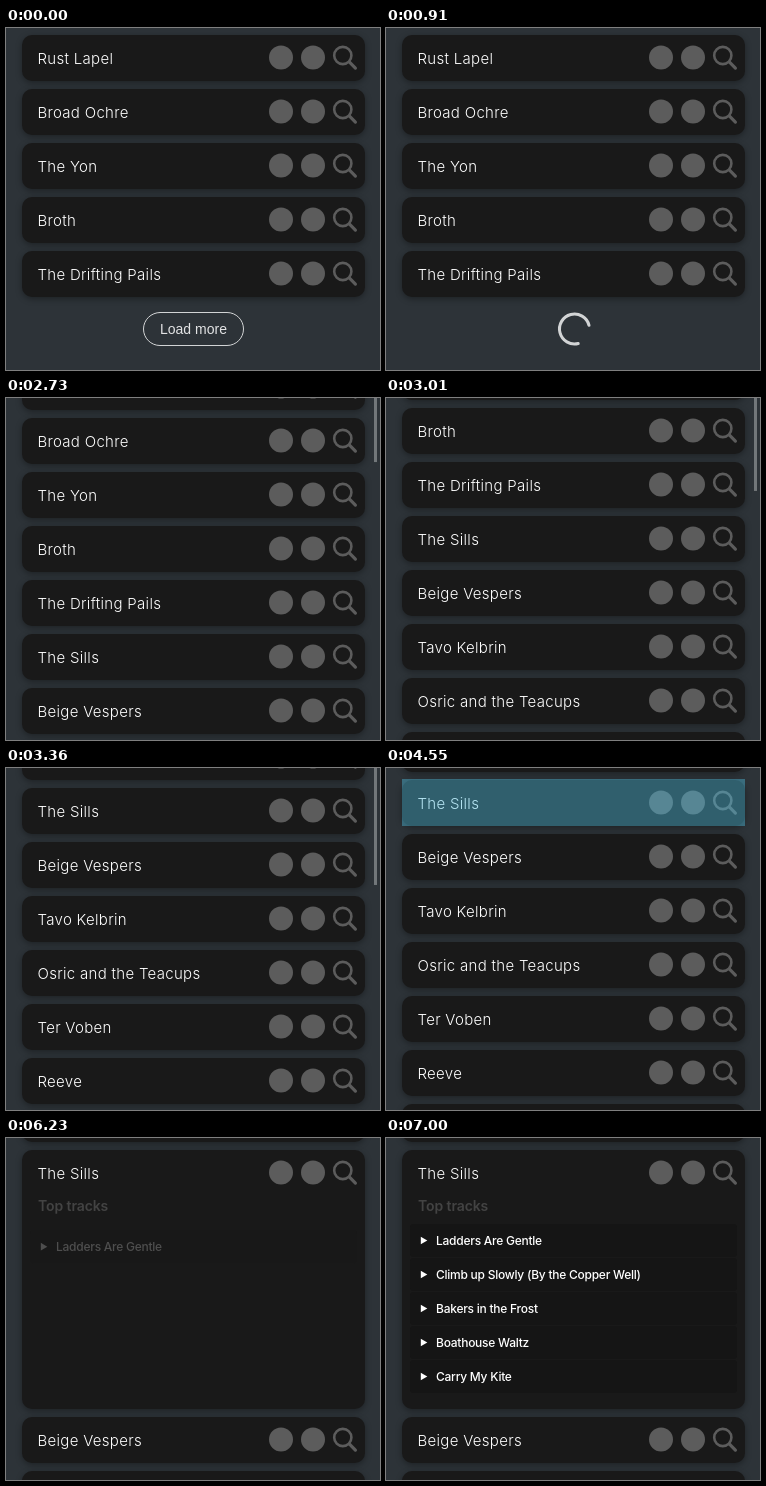
Animation, 374 px wide and 342 px high, one loop 7.84 s. Source, as an HTML page with a canvas:

```html
<!DOCTYPE html>
<html lang="en">
<head>
<meta charset="utf-8">
<title>Band list</title>
<style>
  html, body { margin: 0; width: 100%; height: 100%; overflow: hidden; background: #2d3338; }
  canvas { display: block; }
</style>
</head>
<body>
<canvas id="stage" width="374" height="342"></canvas>
<script>
const ctx = document.getElementById('stage').getContext('2d');
const LOOP = 7840, STEP = 70;
const PITCH = 54, CARD_H = 46, FIRST_Y = 7, OPEN = 5, GROW = 213, SCROLL = 265;
const SANS = 'Inter, "Open Sans", sans-serif';
const bands = ['Rust Lapel', 'Broad Ochre', 'The Yon', 'Broth', 'The Drifting Pails',
  'The Sills', 'Beige Vespers', 'Tavo Kelbrin', 'Osric and the Teacups', 'Ter Voben', 'Reeve', ''];
const tracks = ['Ladders Are Gentle', 'Climb up Slowly (By the Copper Well)',
  'Bakers in the Frost', 'Boathouse Waltz', 'Carry My Kite'];

const progress = (t, start, length) => Math.min(1, Math.max(0, (t - start) / length));
const easeOut = u => 1 - (1 - u) ** 2;

function text(str, x, y, font, color, spacing = 0) {
  ctx.font = font;
  ctx.letterSpacing = spacing + 'px';
  ctx.fillStyle = color;
  ctx.fillText(str, x, y);
}

function roundBox(x, y, w, h, r) {
  ctx.beginPath();
  ctx.roundRect(x, y, w, h, r);
}

function disc(x, y, r) {
  ctx.beginPath();
  ctx.arc(x, y, r, 0, 2 * Math.PI);
}

function tapFlash(x, y, w, h) {
  ctx.fillStyle = 'rgba(80,190,224,.42)';
  ctx.fillRect(x, y, w, h);
}

function icons(y) {
  ctx.fillStyle = ctx.strokeStyle = '#5c5c5c';
  for (const x of [275, 307]) {
    disc(x, y, 12);
    ctx.fill();
  }
  ctx.lineCap = 'round';
  ctx.lineWidth = 2.6;
  disc(336.8, y - 2, 8.6);
  ctx.stroke();
  ctx.lineWidth = 3.2;
  ctx.beginPath();
  ctx.moveTo(343.5, y + 4.7);
  ctx.lineTo(349.4, y + 10.6);
  ctx.stroke();
}

function card(name, y, h) {
  ctx.save();
  ctx.shadowColor = 'rgba(0,0,0,.35)';
  ctx.shadowBlur = 6;
  ctx.shadowOffsetY = 2;
  ctx.fillStyle = '#191919';
  roundBox(16, y, 343, h, 10);
  ctx.fill();
  ctx.restore();
  text(name, 31.5, y + 29, '300 15px ' + SANS, '#fff', .3);
  icons(y + 22.5);
}

function trackList(t, y, h) {
  ctx.save();
  roundBox(16, y, 343, h, 10);
  ctx.clip();
  text('Top tracks', 32, y + 61, '600 14px ' + SANS, '#434343', -.1);
  tracks.forEach((name, i) => {
    const p = easeOut(progress(t, 6190 + i * 120, 320));
    if (!p) return;
    const top = y + 74 + i * 34 + 8 * (1 - p), mid = top + 16.5;
    ctx.globalAlpha = p;
    ctx.fillStyle = '#151515';
    roundBox(24, top, 327, 33, 3);
    ctx.fill();
    ctx.fillStyle = '#fff';
    ctx.beginPath();
    ctx.moveTo(34.8, mid - 3.8);
    ctx.lineTo(41.3, mid);
    ctx.lineTo(34.8, mid + 3.8);
    ctx.fill();
    text(name, 50, mid + 4.5, '500 12px ' + SANS, '#fff', -.25);
  });
  ctx.restore();
}

function loadButton() {
  ctx.strokeStyle = '#d2d4d5';
  ctx.lineWidth = 1;
  roundBox(137.5, 284.5, 100, 33, 16.5);
  ctx.stroke();
  text('Load more', 154, 306, '14px "Liberation Sans", Arial, sans-serif', '#e2e3e4');
}

function spinner(t) {
  const a = (t - 700) / 1000 * 2 * Math.PI;
  ctx.strokeStyle = '#d2d4d5';
  ctx.lineWidth = 3;
  ctx.lineCap = 'round';
  ctx.beginPath();
  ctx.arc(188.5, 301, 15, a, a + 1.5 * Math.PI);
  ctx.stroke();
}

function draw(t) {
  ctx.globalAlpha = 1;
  ctx.fillStyle = '#2d3338';
  ctx.fillRect(0, 0, 374, 342);

  const u = progress(t, 2590, 910);
  const scroll = Math.round(SCROLL * (1 - (1 - u ** 1.4) ** 2.21));
  const grow = Math.round(GROW * easeOut(progress(t, 4550, 280)));
  const shown = easeOut(progress(t, 1850, 320));

  bands.forEach((name, i) => {
    const isNew = i >= OPEN;
    if (isNew && !shown) return;
    const y = FIRST_Y + i * PITCH - scroll + (i > OPEN ? grow : 0) + (isNew ? 8 * (1 - shown) : 0);
    const h = CARD_H + (i === OPEN ? grow : 0);
    if (y > 345 || y + h < -8) return;
    ctx.globalAlpha = isNew ? shown : 1;
    card(name, y, h);
    if (i === OPEN && grow) trackList(t, y, h);
    if (i === OPEN && t === 4550) tapFlash(16, y - 1, 343, CARD_H + 1);
  });
  ctx.globalAlpha = 1;

  if (t < 700) loadButton();
  else if (t < 1750) spinner(t);
  if (t === 630) tapFlash(136, 283, 103, 38);

  if (t >= 2660 && t < 3990) {
    ctx.globalAlpha = 1 - progress(t, 3780, 210);
    ctx.fillStyle = '#72777a';
    ctx.fillRect(368, 0, 3, 54 + .245 * scroll);
  }
}

const begin = performance.now();
function frame() {
  const t = (performance.now() - begin) % LOOP;
  draw(Math.floor(t / STEP) * STEP);
  requestAnimationFrame(frame);
}
frame();
</script>
</body>
</html>
```
